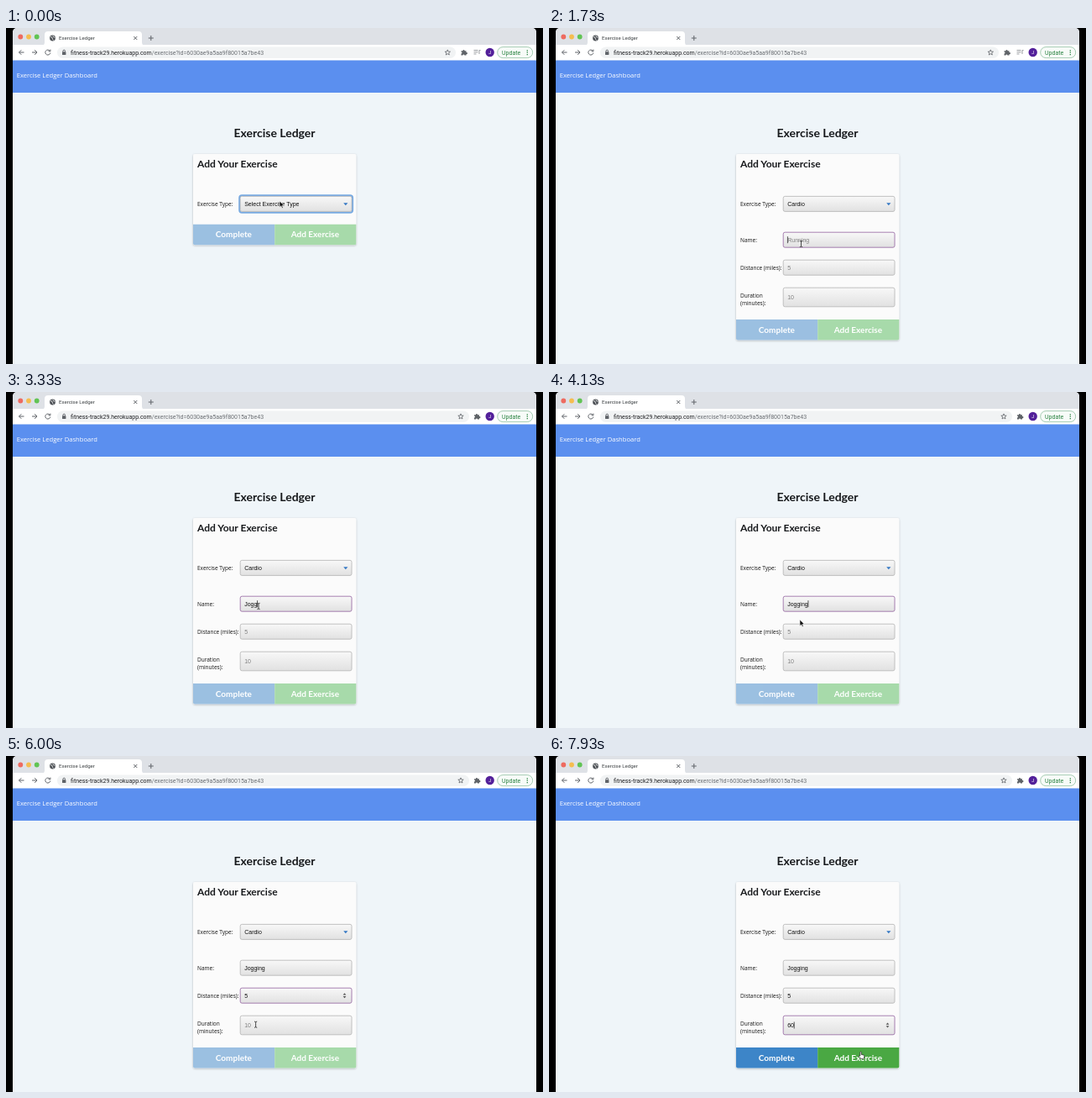
Recreate the animation shown at these times as an HTML page. Size 640 px wide and 400 px high, loop 8 s.

```html
<!DOCTYPE html>
<html lang="en">
<head>
<meta charset="utf-8">
<title>Exercise Ledger</title>
<style>
  html, body { margin: 0; height: 100%; overflow: hidden; background: #000; }
  svg { display: block; width: 100vw; height: 100vh; }
  text { white-space: pre; }
  .ui { font: 7px Roboto, sans-serif; }
  .label { font: 6.5px "Open Sans", sans-serif; fill: #111; }
  .value { font: 7px "Liberation Sans", Arial, sans-serif; fill: #111; }
  .title { font: bold 14px Lato, sans-serif; fill: #17191c; }
  .button { font: bold 10px Lato, sans-serif; fill: #fff; text-anchor: middle; }
  .line { fill: none; stroke: #5f6368; stroke-width: 1; }
  .box { fill: url(#shade); stroke: #b4b4b4; stroke-width: .8; }
</style>
</head>
<body>
<svg viewBox="0 0 640 400">
  <defs>
    <linearGradient id="shade" x2="0" y2="1">
      <stop stop-color="#f8f8f8"/><stop offset="1" stop-color="#e1e1e1"/>
    </linearGradient>
    <filter id="shadow" x="-10%" y="-10%" width="120%" height="120%">
      <feDropShadow dx="0" dy=".8" stdDeviation="1" flood-opacity=".28"/>
    </filter>
  </defs>

  <!-- Browser window -->
  <path d="M8 400V5a5 5 0 0 1 5-5H627a5 5 0 0 1 5 5V400z" fill="#eff5f9"/>
  <path d="M8 21V5a5 5 0 0 1 5-5H627a5 5 0 0 1 5 5V21z" fill="#dee1e6"/>
  <path d="M42 21q4 0 4-4V8q0-4 4-4H158q4 0 4 4v9q0 4 4 4z" fill="#fff"/>
  <rect x="8" y="20" width="624" height="18.5" fill="#fff"/>
  <circle cx="17.3" cy="10.5" r="2.9" fill="#ee6a5f"/>
  <circle cx="27" cy="10.5" r="2.9" fill="#f5bd4f"/>
  <circle cx="36.7" cy="10.5" r="2.9" fill="#61c454"/>
  <circle cx="55.5" cy="12" r="3.4" fill="#4d5156"/>
  <path d="M53 10.5q2 0 2.2 1.6t1.4 2.5M56 9.3q-.5 1.3 2.3 2" fill="none" stroke="#fff" stroke-width=".8"/>
  <text class="ui" x="63" y="14.3" style="font-size:6.1px" fill="#3c4043">Exercise Ledger</text>
  <path class="line" d="M152.3 10l4 4m0-4l-4 4M169.8 12h6m-3-3v6"/>
  <path class="line" d="M21.5 29h-6m2.8-2.8L15.5 29l2.8 2.8M31 29h6m-2.8-2.8L37 29l-2.8 2.8M52.2 27.2a3 3 0 1 0 .6 2.4M52.9 25.6v2.2h-2.3"/>
  <rect id="address" x="61" y="22.5" height="13.5" rx="6.7" fill="#f1f3f4"/>
  <rect x="67" y="28.2" width="4.4" height="3.7" rx=".5" fill="#5f6368"/>
  <path class="line" d="M67.9 28.5v-1a1.3 1.3 0 0 1 2.6 0v1" stroke-width=".8"/>
  <text class="ui" x="77" y="31.5" fill="#202124">fitness-track29.herokuapp.com<tspan fill="#6a6e73">/exercise?id=6030ae9a5aa9f80015a7be43</tspan></text>
  <path id="star" class="line" style="stroke-width:.8" d="M0-3.3L.9-1.1 3.2-1 1.4.5 2 2.8 0 1.5-2 2.8-1.4.5-3.2-1-.9-1.1z"/>
  <path id="puzzle" fill="#5f6368" d="M-3-1.8h1.9a1.1 1.1 0 1 1 2.2 0H3V.1a1.1 1.1 0 1 1 0 2.1V3.6H.9a1 1 0 1 0-2 0H-3V1.6a1 1 0 1 0 0-2z"/>
  <path id="playlist" class="line" style="stroke:#9a9da1" d="M557.5 26.5h5m-5 2.2h5m-5 2.2h3M564 31v-4.5h1.5"/>
  <circle cx="576.7" cy="29" r="5.2" fill="#53209a"/>
  <text class="ui" x="576.7" y="31" style="font-size:5.5px" text-anchor="middle" fill="#fff">J</text>
  <rect x="585.7" y="22.6" width="42" height="13" rx="6.5" fill="#f7fbf8" stroke="#8fbf9f" stroke-width=".8"/>
  <text class="ui" x="591" y="31.5" fill="#27813f">Update</text>
  <path d="M621.3 26.2v6" stroke="#27813f" stroke-width="1.3" stroke-dasharray="1.2 1.2"/>

  <!-- Page -->
  <rect x="8" y="38.5" width="624" height="38.5" fill="#5b8fef"/>
  <text x="12.7" y="58.7" style="font:7.6px 'Open Sans',sans-serif" fill="#fff">Exercise Ledger Dashboard</text>
  <text class="title" x="320" y="130" text-anchor="middle">Exercise Ledger</text>
  <rect id="card" x="223" y="150" width="194.3" rx="2" fill="#fbfbfb" filter="url(#shadow)"/>
  <text class="title" x="228" y="166" style="font-size:12px">Add Your Exercise</text>
  <text class="label" x="228" y="212.3">Exercise Type:</text>
  <rect id="ring" x="278.2" y="199.2" width="134.9" height="20.6" rx="3" fill="none" stroke="#78aae2" stroke-width="2"/>
  <rect class="box" x="279.2" y="200.4" width="132.8" height="18" rx="2"/>
  <text id="type" class="value" x="284.2" y="212.1"></text>
  <path d="M402.2 208.2h5.2l-2.6 3z" fill="#3578c4"/>
  <g id="details">
    <text class="label" x="228" y="255">Name:</text>
    <text class="label" x="228" y="288">Distance (miles):</text>
    <text class="label" x="228" y="320.8">Duration<tspan x="228" dy="9.2">(minutes):</tspan></text>
    <g id="fields"></g>
  </g>
  <g id="buttons">
    <g id="fills">
      <path d="M223 0h97.2v24.5H225q-2 0-2-2z" fill="#3d85c8"/>
      <path id="add" d="M320.2 0h97.1v22.5q0 2-2 2h-95.1z"/>
    </g>
    <text class="button" x="271.4" y="15.7">Complete</text>
    <text class="button" x="368.4" y="15.7">Add Exercise</text>
  </g>

  <!-- Pointers -->
  <g id="pointer">
    <path id="arrow" d="M0 0v7.4l1.8-1.6 1.2 2.7 1.3-.6-1.2-2.6h2.4z" fill="#111" stroke="#fff" stroke-width=".6"/>
    <path id="beam" d="M-1.6-3.6q1.6 0 1.6 1 0-1 1.6-1M0-2.6v5.2m-1.6 1q1.6 0 1.6-1 0 1 1.6 1" fill="none" stroke="#222" stroke-width=".8"/>
    <path id="hand" d="M-1.2-3.5q.8-.9 1.5 0V-.6l2.7.6q.9.3.8 1.2L3.3 4.3H-.5L-3 1.2q.1-1 1.8-.1z" fill="#fff" stroke="#222" stroke-width=".7"/>
  </g>
</svg>
<script>
const LOOP = 8000;
const CHOSEN = 1300, TOOLBAR_CHANGE = 2300, ENABLED = 6740;
const get = id => document.getElementById(id);
const show = (el, visible) => el.setAttribute('visibility', visible ? 'inherit' : 'hidden');
const place = (el, x, y) => el.setAttribute('transform', `translate(${x} ${y})`);

// keys: the moment each character of text is typed
const fields = [
  { y: 243.2, height: 18, hint: 'Running', text: 'Jogging', focus: [1600, 4400],
    keys: [2760, 2920, 3080, 3250, 3420, 3570, 3740] },
  { y: 276.2, height: 18, hint: '5', text: '5', focus: [4400, 6200], keys: [5420], number: true },
  { y: 309.2, height: 22.6, hint: '10', text: '60', focus: [6200, LOOP],
    keys: [ENABLED, 6910], number: true }
];

// time, x, y
const path = [
  [0, 326, 206], [850, 307, 199], [1200, 307, 199], [1600, 300.5, 257],
  [2700, 300.5, 257], [3200, 301, 255], [3900, 301, 255], [4350, 297, 286],
  [4500, 297, 286], [4800, 295.5, 296], [5700, 295.5, 296], [6100, 298, 324],
  [7000, 298, 324], [7750, 372, 356], [LOOP, 372, 356]
];

get('fields').innerHTML = fields.map(f => {
  const middle = f.y + f.height / 2;
  return `<g><rect class="box" x="279.2" y="${f.y}" width="132.8" height="${f.height}" rx="2"/>
    <text class="value" x="284.2" y="${middle + 2.6}"></text>
    <path d="M0 ${middle - 4}v8" stroke="#111" stroke-width=".7"/>
    <path d="M401.6 ${middle - .8}h3.8l-1.9-2.2zm0 1.6h3.8l-1.9 2.2z" fill="#555"/></g>`;
}).join('');
fields.forEach((f, i) => f.parts = get('fields').children[i].children);

function pointerAt(t) {
  const i = path.findIndex(p => p[0] > t);
  const [t0, x0, y0] = path[i - 1], [t1, x1, y1] = path[i];
  const u = (t - t0) / (t1 - t0), ease = u * u * (3 - 2 * u);
  return [x0 + (x1 - x0) * ease, y0 + (y1 - y0) * ease];
}

function drawField(f, t) {
  const [box, value, caret, spinner] = f.parts;
  const typed = f.keys.filter(k => k <= t);
  const focused = t >= f.focus[0] && t < f.focus[1];
  value.textContent = typed.length ? f.text.slice(0, typed.length) : f.hint;
  value.style.fill = typed.length ? '#111' : '#808080';
  box.style.stroke = focused ? '#92619f' : '';
  const blinkStart = typed.length ? typed[typed.length - 1] : f.focus[0];
  const caretOn = t >= CHOSEN && focused && (t - blinkStart) % 1000 < 500;
  show(caret, caretOn);
  if (caretOn) place(caret, 284.4 + (typed.length ? value.getComputedTextLength() : 0), 0);
  show(spinner, f.number && focused);
}

function draw(t) {
  const chosen = t >= CHOSEN, compact = t >= TOOLBAR_CHANGE;
  get('address').setAttribute('width', compact ? 491 : 475);
  place(get('star'), compact ? 542 : 526.3, 29.2);
  place(get('puzzle'), compact ? 561 : 545.5, 29);
  show(get('playlist'), !compact);

  const buttonTop = chosen ? 347 : 233.7;
  get('type').textContent = chosen ? 'Cardio' : 'Select Exercise Type';
  show(get('ring'), !chosen);
  show(get('details'), chosen);
  get('card').setAttribute('height', buttonTop + 24.5 - 150);
  place(get('buttons'), 0, buttonTop);
  fields.forEach(f => drawField(f, t));

  const [x, y] = pointerAt(t);
  const overButton = t >= ENABLED && y > buttonTop;
  const overField = chosen && x > 279 && fields.some(f => y > f.y && y < f.y + f.height);
  const enabled = Math.min(1, Math.max(0, (t - ENABLED) / 100));
  get('fills').setAttribute('opacity', .5 + .5 * enabled);
  get('add').setAttribute('fill', overButton && x > 320 ? '#4aa843' : '#55ba5b');

  place(get('pointer'), x, y);
  show(get('hand'), overButton);
  show(get('beam'), overField);
  show(get('arrow'), !overButton && !overField);
}

function frame() {
  draw(performance.now() % LOOP);
  requestAnimationFrame(frame);
}
frame();
</script>
</body>
</html>
```
